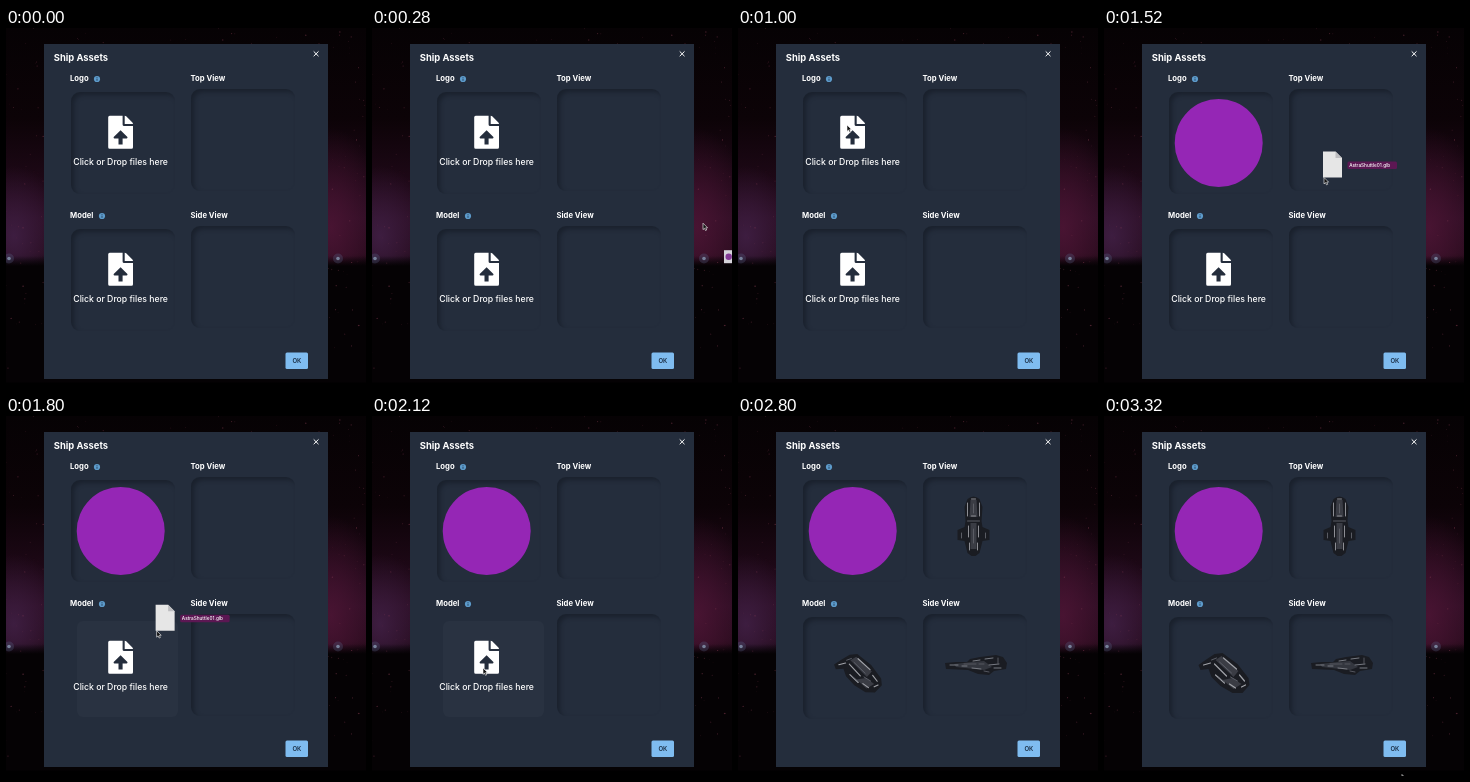
An HTML page that plays this animation: 360x360 px, repeating every 3.36 s.

```html
<!DOCTYPE html>
<html lang="en">
<head>
<meta charset="utf-8">
<title>Ship Assets</title>
<style>
html, body { margin: 0; width: 100%; height: 100%; overflow: hidden; background: #000; }
#stage { position: relative; width: 360px; height: 360px; overflow: hidden; background:
  linear-gradient(#0000 228px, #050204 238px 354px, #000 355px),
  radial-gradient(50px 70px at 8px 208px, #3d1d40, #0000),
  radial-gradient(55px 100px at 325px 200px, #481432, #0000),
  linear-gradient(#060204 0, #0c0307 90px, #1d0816 150px, #2a0d22 190px, #240a1a 225px, #050204 240px); }
svg { position: absolute; left: 0; top: 0; }
#dialog { position: absolute; left: 38px; top: 16px; width: 284px; height: 335px; background: #242d3c; }
.box { position: absolute; width: 104px; height: 102px; border-radius: 9px;
  box-shadow: inset 3px 3px 4px #1a212d; }
.box.over { width: 101px; height: 96px; margin: 4px 0 0 6px; border-radius: 6px;
  background: #293241; box-shadow: none; }
text { font-family: Inter, "Open Sans", sans-serif; fill: #fff; }
.label { font-size: 7.7px; font-weight: 700; }
.hint { font-size: 8.7px; font-weight: 500; text-anchor: middle; }
.file { font-size: 4.7px; font-weight: 500; }
</style>
</head>
<body>
<div id="stage">
  <svg id="sky" width="360" height="360"></svg>
  <div id="dialog"></div>
  <div class="box" id="logoBox" style="left:65px;top:64px"></div>
  <div class="box" style="left:185px;top:61px"></div>
  <div class="box" id="modelBox" style="left:65px;top:201px"></div>
  <div class="box" style="left:185px;top:198px"></div>

  <svg width="360" height="360">
    <defs>
      <g id="info">
        <circle r="3.1" fill="#5d9bcb"/>
        <path d="M0-1.8v.9M0-.3v2.1" stroke="#24405c" stroke-width=".9"/>
      </g>
      <g id="drop">
        <g fill="#fff">
          <path d="M1.5 0H14.4V8.8Q14.4 10.3 15.9 10.3H24.8V31.5Q24.8 33 23.3 33H1.5Q0 33 0 31.5V1.5Q0 0 1.5 0z"/>
          <path d="M16.5 0Q17.4 0 18 .6L24.2 6.8Q24.8 7.4 24.8 8.2H16.5z"/>
        </g>
        <path d="M12.4 14.6L19.2 21.4Q19.7 22.7 18.4 22.7H14.4V28.8H10.3V22.7H6.2Q5 22.7 5.5 21.4z" fill="#242d3c"/>
        <text class="hint" x="12.4" y="49.6">Click or Drop files here</text>
      </g>
    </defs>

    <text x="47.8" y="32.6" font-size="9.4" font-weight="700">Ship Assets</text>
    <path d="M307.7 23.4l4.8 4.8m0-4.8l-4.8 4.8" stroke="#fff" stroke-width="1"/>
    <text class="label" x="64" y="52.8">Logo</text>
    <text class="label" x="184.5" y="52.8">Top View</text>
    <text class="label" x="64" y="189.8">Model</text>
    <text class="label" x="184.5" y="189.8">Side View</text>
    <use href="#info" x="91" y="51"/>
    <use href="#info" x="96" y="188"/>
    <rect x="279.5" y="324.5" width="22.5" height="16.5" rx="1.5" fill="#7fbcf0"/>
    <text x="290.8" y="335.2" font-size="6" font-weight="600" text-anchor="middle" style="fill:#1c3148">OK</text>

    <use id="logoDrop" href="#drop" x="102.2" y="87.7"/>
    <use id="modelDrop" href="#drop" x="102.2" y="224.7"/>
    <circle id="logo" cx="114.7" cy="115" r="44" fill="#9526b5"/>

    <g id="ships" fill="#1a1c22" stroke-linecap="round">
      <g transform="translate(235.5 109)">
        <path d="M-6-26Q0-31 6-26L9-18 8-4 9 2 16 5 16 15 9 16 6 28 2 31-2 31-6 28-9 16-16 15-16 5-9 2-8-4-9-18z"/>
        <path d="M-3-25h6l1 17h-8zM-3-2h6v26h-6z" fill="#3a3c44"/>
        <path d="M-6-22v13M6-22v13M-5 1v11M5 1v11M-2-9h4M-2-26h4M-4 18v7M4 18v7" stroke="#8d8e94"/>
        <path d="M0-21v9M0 4v14M-12 8v5M12 8v5M-6-4h12" stroke="#5a5c64"/>
      </g>
      <g transform="translate(238 249)">
        <path d="M-31-2L-20-3-9-3-6-6 4-8 20-10 27-8 31-2 30 4 18 6 13 10 2 9-8 5-30 4z"/>
        <path d="M-22-1L-4-3 8-4 16 2 8 5-20 2z" fill="#33363e"/>
        <path d="M-26 0h8M-14 1h5M-3-4l7-1M9-6l8-1M13 0l10-1M-4 3l9 1M18 3h7" stroke="#777a82"/>
        <path d="M-12-1h12M22-7v6M8 6l5 1M3-1h5" stroke="#54565f"/>
      </g>
      <g id="model">
        <path d="M-26-8L-19-13-10-19-2-20 13-9 24 5 25 12 18 20 8 20-4 13-13 4-16-4-24-3z"/>
        <path d="M-9-13L-3-17 14-2 9 4zM-2 7L8 5 17 11 9 16z" fill="#3a3c44"/>
        <path d="M-10-9L2 3M-1-15L12-4M-21-8l7-2M-9 2l9 8M15 2l5 6M5 11l6 4M17 14l4-2" stroke="#a0a2a8" stroke-width="1.2"/>
        <path d="M-5-11L7 0M6 4l7 4M-13-13l5-2M-6 4l6 5" stroke="#5c5f68"/>
      </g>
    </g>

    <g id="image">
      <rect x="21" y="27" width="9.5" height="13" fill="#d5d3da"/>
      <circle cx="25.7" cy="33.5" r="3.2" fill="#843a96"/>
      <rect x="34" y="30" width="39" height="7.5" rx="2" fill="#80207b"/>
      <text class="file" x="37.5" y="35.4">Triquetra.png</text>
    </g>
    <g id="mesh">
      <path d="M-1-26H11.5L18-19.5V0H-1z" fill="#e6e6e6"/>
      <path d="M11.5-26V-19.5H18z" fill="#bdbdc0"/>
      <rect x="23.5" y="-16" width="49.5" height="7.6" rx="1.5" fill="#5c1753"/>
      <text class="file" x="25.2" y="-10.5">AstraShuttle01.glb</text>
    </g>
    <path id="cursor" d="M0 0V6.4L1.5 5.1 2.5 7.3 3.7 6.8 2.7 4.6H4.6z" fill="#111" stroke="#fff" stroke-width=".6"/>
  </svg>
</div>
<script>
const $ = id => document.getElementById(id);
const LOOP = 3360, STEP = 40;

// Pointer path: time, x, y
const path = [
  [0, 375, 225], [200, 370, 210], [600, 175, 136], [880, 109, 97], [1040, 109, 97],
  [1240, 370, 150], [1320, 370, 165], [1520, 220, 149.5], [1960, 111, 252],
  [2200, 111, 252], [2600, 296, 372], [3200, 305, 372], [3320, 298, 358.5], [3360, 298, 358.5]
];

let seed = 7;
const rand = () => (seed = seed * 16807 % 2147483647) / 2147483647;

function drawSky() {
  let stars = '';
  for (let i = 0; i < 420; i++) {
    const x = rand() * 360, y = rand() * 352, r = .3 + rand() * .4, a = .15 + rand() * .4;
    stars += `<circle cx="${x}" cy="${y}" r="${r}" fill="#a04a62" opacity="${a}"/>`;
  }
  for (const x of [3, 332]) {
    stars += `<circle cx="${x}" cy="230.5" r="5" fill="#5a6488" opacity=".3"/>
      <circle cx="${x}" cy="230.5" r="1.8" fill="#8796b0" opacity=".8"/>`;
  }
  $('sky').innerHTML = stars;
}

function pointer(t) {
  const i = path.findIndex(p => p[0] > t);
  const [t0, x0, y0] = path[i - 1], [t1, x1, y1] = path[i];
  const k = (t - t0) / (t1 - t0);
  return [x0 + (x1 - x0) * k, y0 + (y1 - y0) * k];
}

const show = (id, on) => $(id).style.display = on ? '' : 'none';

function render(now) {
  const t = Math.floor(now % LOOP / STEP) * STEP;
  const [x, y] = pointer(t);
  for (const id of ['cursor', 'image', 'mesh']) $(id).setAttribute('transform', `translate(${x} ${y})`);

  const dragImage = t < 920, dragMesh = t >= 1280 && t < 2080;
  show('image', dragImage);
  show('mesh', dragMesh);

  const hasLogo = t >= 1080, hasModel = t >= 2320;
  show('logoDrop', !hasLogo);
  show('logo', hasLogo);
  show('modelDrop', !hasModel);
  show('ships', hasModel);

  $('logoBox').classList.toggle('over', dragImage && x < 168);
  $('modelBox').classList.toggle('over', t >= 1280 && t < 2160 && x < 168 && y > 201);

  const turn = Math.min(1, Math.max(0, (t - 2800) / 520));
  $('model').setAttribute('transform',
    `translate(120.5 257) rotate(${2 - 2 * turn}) scale(${.95 + .05 * turn})`);
}

function frame() {
  render(performance.now());
  requestAnimationFrame(frame);
}

drawSky();
frame();
</script>
</body>
</html>
```
